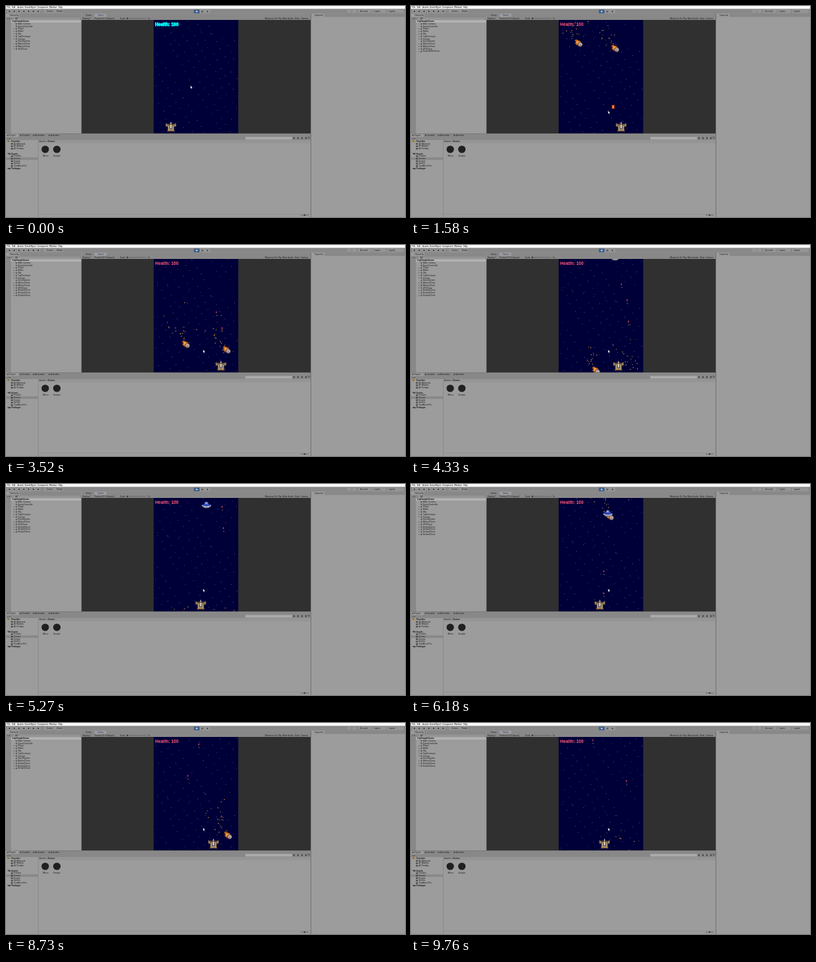
Recreate the animation shown at these times as an HTML page with a canvas. Size 600 px wide and 318 px high, loop 9.79 s.

```html
<!DOCTYPE html>
<html lang="en">
<head>
<meta charset="utf-8">
<title>Space shooter in the editor</title>
<style>
  html, body { margin: 0; width: 100%; height: 100%; overflow: hidden; background: #9c9c9c; }
  canvas { display: block; }
</style>
</head>
<body>
<canvas id="stage" width="600" height="318"></canvas>
<script>
const ctx = document.getElementById('stage').getContext('2d');
const LOOP = 9790;
const FIELD = { x: 222, y: 21, w: 127.5, h: 171 };

// Times in seconds, distances in pixels.
const shipPath = [[0, 248], [.45, 248], [1.38, 304], [1.58, 316], [2.17, 317], [2.5, 325],
  [2.67, 333], [2.85, 337], [3.25, 327], [4.33, 312], [5.41, 290], [6.05, 290],
  [6.18, 284], [6.4, 274], [6.96, 274], [7.85, 324], [8.14, 324], [9.76, 291]];
const cursorX = [[0, 278], [.6, 297]];
const cursorY = [[0, 122], [.6, 160]];
const meteors = [
  { at: 1.58, x: 252, y: 56, vx: 9.5, vy: 48.3, from: 0, to: 5.2 },
  { at: 1.58, x: 307, y: 64, vx: 12.8, vy: 48.5, from: 0, to: 5 },
  { at: 6.18, x: 299, y: 49, vx: 13.7, vy: 47.3, from: 5.2, to: 9.9 }
];
const ufo = { at: 6.18, x: 296, y: 45, vx: -6, vy: 14, to: 7.4 };
const bullets = [
  { from: 1.38, x: 304, life: 2, speed: 100, power: true },
  { from: 2.17, x: 316.5, life: 3.6 },
  { from: 2.63, x: 325, life: 3.6 },
  { from: 3.25, x: 327, life: 3.6 },
  { from: 5.41, x: 290, life: 1.99 },
  { from: 6.05, x: 290, life: 3.6 },
  { from: 6.96, x: 273.5, life: 3.6 },
  { from: 8.14, x: 324, life: 3.6 }
];

const rand = n => { const v = Math.sin(n * 127.1 + 11.7) * 43758.5453; return v - Math.floor(v); };
const posAt = (body, t) => [body.x + body.vx * (t - body.at), body.y + body.vy * (t - body.at)];
const alive = (b, t) => t >= b.from && t < b.from + b.life;

function track(keys, t) {
  for (let i = 1; i < keys.length; i++) {
    const [t0, a] = keys[i - 1], [t1, b] = keys[i];
    if (t < t1) return a + (b - a) * (t - t0) / (t1 - t0);
  }
  return keys[keys.length - 1][1];
}

function box(color, x, y, w, h) {
  ctx.fillStyle = color;
  ctx.fillRect(x, y, w, h);
}

function oval(color, x, y, rx, ry = rx, turn = 0) {
  ctx.fillStyle = color;
  ctx.beginPath();
  ctx.ellipse(x, y, rx, ry, turn, 0, 7);
  ctx.fill();
}

function shape(color, ...points) {
  ctx.fillStyle = color;
  ctx.beginPath();
  points.forEach(([x, y]) => ctx.lineTo(x, y));
  ctx.fill();
}

function label(text, x, y, bold, color = '#202020') {
  ctx.font = `${bold ? 'bold ' : ''}3.2px Roboto, sans-serif`;
  ctx.fillStyle = color;
  ctx.fillText(text, x, y);
}

function drawToolbar() {
  box('#f8f8f8', 0, 0, 600, 4.5);
  ['File', 'Edit', 'Assets', 'GameObject', 'Component', 'Window', 'Help'].forEach((name, i) =>
    label(name, [1.5, 9, 17, 28, 47, 65, 78.5][i], 2.4, false, '#000'));
  box('#888', 0, 4.5, 600, 7);
  for (let i = 0; i < 7; i++) {
    box('#959595', 2 + i * 7.2, 5.5, 6.4, 5);
    box('#333', 4.3 + i * 7.2, 7, 1.8, 2);
  }
  box('#959595', 57, 5.5, 14, 5);
  label('Center', 61, 8.2);
  box('#959595', 72, 5.5, 14, 5);
  label('Global', 76, 8.2);
  box('#3c5f8c', 282.5, 5.5, 8.5, 5.5);
  shape('#dbe7ff', [285.8, 6.7], [288.6, 8.2], [285.8, 9.7]);
  box('#959595', 291.3, 5.5, 16, 5.5);
  box('#333', 294, 7, .8, 2.6);
  box('#333', 295.6, 7, .8, 2.6);
  shape('#333', [302, 7], [304.5, 8.3], [302, 9.6]);
  box('#959595', 513, 5.5, 6, 5);
  box('#959595', 521, 5.5, 6, 5);
  ['Account', 'Layers', 'Layout'].forEach((name, i) => {
    const x = [530, 551, 573][i];
    box('#959595', x, 5.5, [19, 20, 25][i], 5);
    label(name, x + 2.5, 8.3);
  });
}

function drawHierarchy(t) {
  box('#888', 0, 11.5, 113, 10);
  box('#9c9c9c', 0, 11.5, 20, 5);
  label('Hierarchy', 5.5, 14.2);
  label('+ ▾', 2, 19);
  box('#959595', 11, 17.5, 100, 3.5);
  label('All', 14, 19.3);
  box('#888', 0, 21.3, 7.5, 170.7);
  box('#b2b2b2', 7.5, 21.3, 105.5, 3.7);
  shape('#333', [9, 22], [12, 22], [10.5, 24]);
  box('#333', 12.5, 21.8, 2, 2.5);
  label('SampleScene', 15, 23.3, true, '#111');

  const items = ['Main Camera', 'GameController', 'Player', 'Mode', 'Sky', 'TopDestroyer', 'Canvas', 'EventSystem'];
  meteors.forEach(m => { if (t >= m.from && t < m.to) items.push('MeteorClone'); });
  if (t < ufo.to) items.push('UFOClone');
  bullets.forEach(b => {
    if (alive(b, t)) items.push(b.power ? 'PowerBulletClone' : 'DefaultClone');
  });
  items.forEach((name, i) => {
    const y = 27 + i * 3.77;
    box('#555', 14.6, y - 1.1, 2, 2.2);
    if (i > 1 && i !== 7) shape('#555', [11.5, y - 1], [13, y], [11.5, y + 1]);
    label(name, 18, y);
  });
}

function drawGamePanel() {
  box('#888', 113.5, 11.5, 344.5, 9.5);
  box('#9c9c9c', 133, 11.5, 18, 5);
  label('Scene', 120, 14.2);
  label('Game', 138.2, 14.2, false, '#1c3c70');
  label('Display 1', 115, 18.8);
  label('Portrait (9:16 Aspect)', 133, 18.8);
  label('Scale', 171.5, 18.8);
  box('#555', 182, 18.5, 29, .6);
  oval('#333', 182.5, 18.8, 1.2);
  label('1x', 213, 18.8);
  label('Maximize On Play', 389.5, 18.8);
  label('Mute Audio', 416, 18.8);
  label('Stats', 434, 18.8);
  label('Gizmos', 443.5, 18.8);
  box('#303030', 113.5, 21, 344.5, 171);
}

function drawInspector() {
  box('#888', 459, 11.5, 141, 5);
  box('#9c9c9c', 459, 11.5, 20, 5);
  label('Inspector', 464, 14.2);
  box('#666', 458, 11.5, .8, 307);
}

function drawProject() {
  box('#6e6e6e', 0, 192, 458, .8);
  box('#888', 0, 192.8, 458, 9.2);
  box('#9c9c9c', 0, 192.8, 19, 4.7);
  ['Project', 'Console', 'Animation', 'Animator'].forEach((name, i) => {
    const x = [4.5, 24, 43.5, 67][i];
    box('#444', x - 2.8, 194, 1.8, 2);
    label(name, x, 195.2);
  });
  label('+ ▾', 2, 199.6);
  box('#aaa', 360, 197.3, 70, 4);
  for (let i = 0; i < 4; i++) box('#444', 432 + i * 6, 197.8, 2, 2.6);
  label('10', 453, 199.4);
  box('#858585', 48, 202, .8, 116);
  box('#959595', 49, 202, 409, 4.7);
  label('Assets > ', 50, 204.3);
  label('Scenes', 62.8, 204.3, true);

  box('#888', 0, 228.2, 48, 3.6);
  const folder = (name, x, y, bold, icon = '#444') => {
    if (bold) shape('#333', [2, y - .8], [4.5, y - .8], [3.2, y + 1]);
    box(icon, x - 4, y - 1, 2.8, 2.2);
    label(name, x, y, bold);
  };
  folder('Favorites', 8, 203.8, true, '#b08a3c');
  ['All Materials', 'All Models', 'All Prefabs'].forEach((n, i) => folder(n, 11.5, 207.6 + i * 3.7));
  folder('Assets', 8, 222.6, true);
  ['Prefabs', 'Scenes', 'Scripts', 'Sprites', 'TextMesh Pro'].forEach((n, i) => folder(n, 11.5, 226.3 + i * 3.7));
  folder('Packages', 8, 245, true);

  oval('#202020', 59, 216, 5.6);
  oval('#202020', 76.5, 216, 5.6);
  label('Menu', 55.5, 226.2);
  label('Sample', 71, 226.2);
  box('#8c8c8c', 49, 313, 409, .6);
  box('#555', 443, 314.8, 12, .7);
  oval('#333', 449, 315.1, 1.2);
}

function drawStars(t) {
  for (let row = 0; row < 16; row++) {
    for (let col = 0; col < 8; col++) {
      const id = row * 8 + col;
      const x = 224 + (col * 16.5 + row * 6.3 + rand(id) * 4) % 126;
      const y = 21 + (row * 10.8 + col * 4 + rand(id + 300) * 4 + t * 10) % 172.8;
      box(rand(id + 600) > .5 ? '#4c4c78' : '#353568', Math.round(x), Math.round(y), 1, 1);
    }
  }
}

// Sparks fan out sideways while drifting down behind their meteor.
function drawSparks(meteor, seed, t) {
  const first = Math.max(0, Math.floor((t - 2) / .07));
  for (let n = first; n * .07 <= t; n++) {
    const born = n * .07, age = t - born;
    if (born < meteor.from || age > .4 + 1.6 * rand(n + seed)) continue;
    const [x, y] = posAt(meteor, born);
    const dx = (rand(n + seed + 40) - .65) * (8 + age * 34);
    const dy = (rand(n + seed + 80) - .5) * (8 + age * 16) + age * 20;
    box(rand(n + seed + 120) > .5 ? '#c8902a' : '#84702c', x + dx - 3, y + dy - 4, 1.3, 1.3);
  }
}

function drawMeteor(x, y) {
  ctx.save();
  ctx.translate(x, y);
  ctx.rotate(.62);
  shape('#b85a16', [-6.5, -2.5], [0, -4.2], [4, -3], [4, 3.2], [-1, 4], [-5, 3], [-3.5, 1], [-7, .5]);
  shape('#f0a13c', [-5, -1.5], [1, -2.8], [2, 2], [-3, 2]);
  oval('#6c5550', 2.8, .2, 3.7, 3.4);
  oval('#b9aaa6', 3.2, 0, 2.8, 2.5);
  oval('#7d6d72', 3.8, .8, 1);
  ctx.restore();
}

function drawUfo(x, y) {
  oval('#77777f', x, y + 1.6, 5, 2.6);
  oval('#5878d0', x, y - 2.6, 2.8, 2.8);
  oval('#c4c6d2', x, y + .3, 7, 2.3);
  oval('#2444c0', x, y - .4, 6, 1.7);
  oval('#b8c4ec', x - .6, y - 3.6, 1, .9);
}

function drawShip(x) {
  ctx.save();
  ctx.translate(x, 182);
  shape('#dedee6', [-1.5, -3], [0, -8], [1.5, -3]);
  box('#5d4830', -8, -4.5, 16, 4.5);
  box('#ab9468', -7, -3.5, 14, 2.6);
  box('#75705f', -8, -5, 2, 3);
  box('#75705f', 6, -5, 2, 3);
  shape('#685238', [-5, -4], [5, -4], [5, 5], [6, 7], [-6, 7], [-5, 5]);
  box('#b8a47a', -4, -2, 8, 7.5);
  box('#5a5360', -2.4, -1.5, 4.8, 5.5);
  box('#d8d0c0', -1, -3, 2, 5.5);
  box('#b87a30', -4.5, 5, 2, 1.6);
  box('#b87a30', 2.5, 5, 2, 1.6);
  ctx.restore();
}

function drawBullet({ from, x, power, speed = 52 }, t) {
  const y = 172 - speed * (t - from);
  if (power) {
    box('#8f2c12', x - 2.2, y - 3, 4.4, 6.2);
    box('#ee7424', x - 1.4, y - 2.2, 2.8, 4.6);
    box('#ffc05a', x - .6, y - .5, 1.2, 1.5);
  } else {
    box('#8c2850', x - .9, y - 1.8, 1.6, 3);
    box('#d05a58', x - .5, y - 1.1, .8, 1.4);
    box('#988060', x - .5, y + 4, 1.8, .9);
  }
}

function drawHealth(t) {
  const opening = t < .4;
  ctx.font = 'bold 6.6px "Liberation Sans", sans-serif';
  ctx.fillStyle = opening ? '#00f0f4' : '#ff5878';
  ctx.fillText('Health: 100', 224.2, 28);
  if (opening) {
    ctx.strokeStyle = '#00f0f4';
    ctx.lineWidth = .9;
    ctx.strokeText('Health: 100', 224.2, 28);
  }
}

function drawGame(t) {
  const { x, y, w, h } = FIELD;
  ctx.save();
  ctx.beginPath();
  ctx.rect(x, y, w, h);
  ctx.clip();
  box('#000038', x, y, w, h);
  drawStars(t);
  meteors.forEach((m, i) => {
    drawSparks(m, i * 200, t);
    if (t >= m.from && t < m.to) drawMeteor(...posAt(m, t));
  });
  if (t < ufo.to) drawUfo(...posAt(ufo, t));
  bullets.forEach(b => { if (alive(b, t)) drawBullet(b, t); });
  drawShip(track(shipPath, t));
  drawHealth(t);
  ctx.restore();
}

function drawCursor(t) {
  const x = track(cursorX, t), y = track(cursorY, t);
  shape('#fff', [x - .5, y - 2], [x + 2.2, y + 1], [x + 1, y + 1.1], [x + 1.6, y + 2.6], [x + .8, y + 2.8], [x + .2, y + 1.4], [x - .5, y + 1.8]);
}

function draw() {
  const t = performance.now() % LOOP / 1000;
  ctx.textBaseline = 'middle';
  box('#9c9c9c', 0, 0, 600, 318);
  drawToolbar();
  drawHierarchy(t);
  drawGamePanel();
  drawInspector();
  drawProject();
  drawGame(t);
  drawCursor(t);
  requestAnimationFrame(draw);
}
draw();
</script>
</body>
</html>
```
